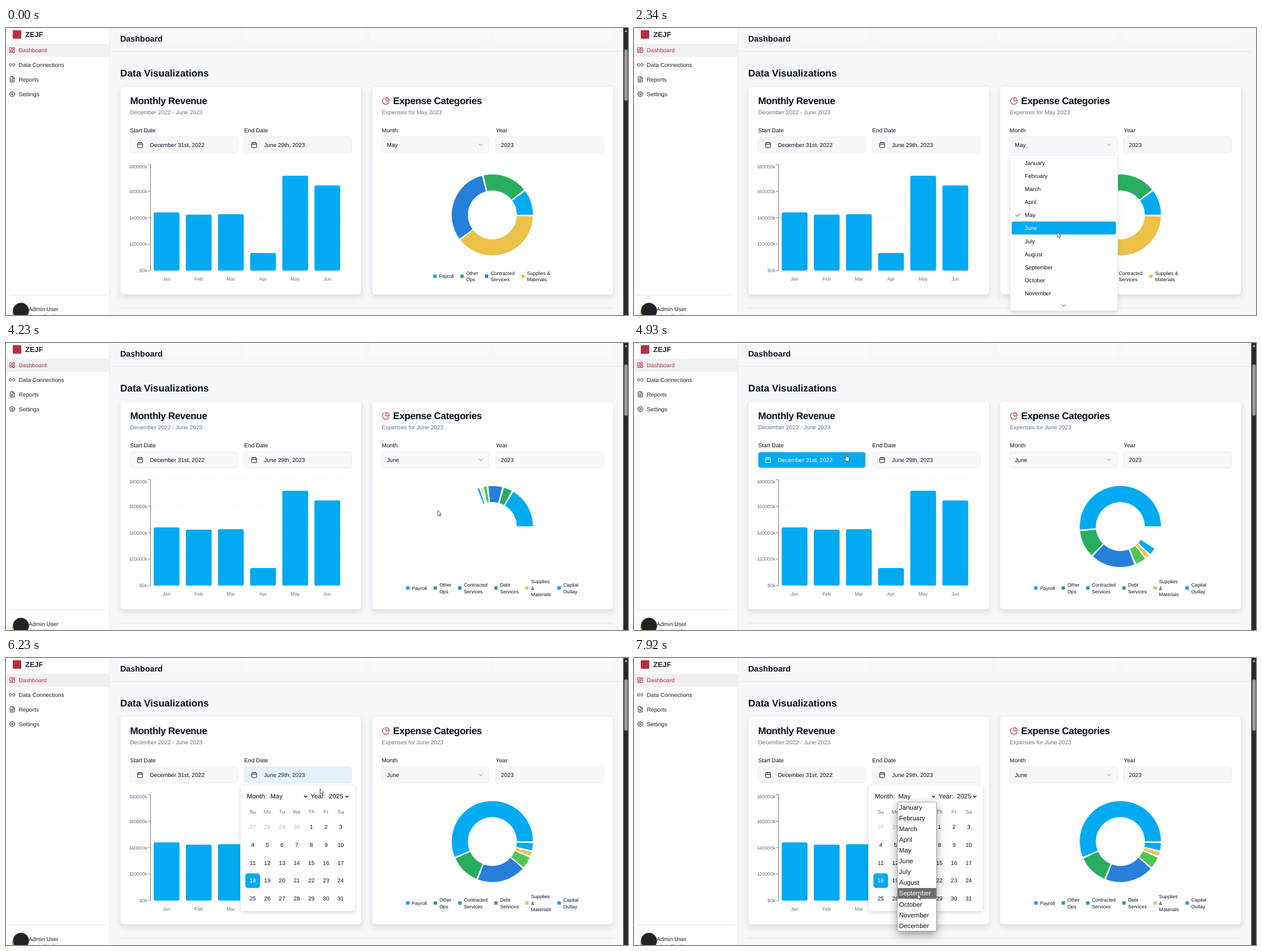
Animation of 1100 by 509 pixels, one loop 7990 ms. Source, as an HTML page:

```html
<!DOCTYPE html>
<html lang="en">
<head>
<meta charset="utf-8">
<title>Dashboard</title>
<style>
html, body { margin: 0; width: 100%; height: 100%; overflow: hidden; background: #f6f8fa; }
svg { display: block; width: 100%; height: 100%; }
text { font-family: "Liberation Sans", Arial, sans-serif; text-rendering: geometricPrecision; white-space: pre; }
.card { filter: drop-shadow(0 5px 5px rgba(15, 23, 42, .11)); }
.pop { filter: drop-shadow(0 2px 3px rgba(15, 23, 42, .15)); }
.menu { filter: drop-shadow(0 6px 8px rgba(0, 0, 0, .38)); }
</style>
</head>
<body>
<svg id="stage" viewBox="0 0 1100 509"></svg>
<script>
const LOOP = 7990;
const INK = '#0b1120', MUTED = '#64748b', RED = '#b5303f', SKY = '#02aaf2', LINE = '#e2e8f0';
const GREEN = '#28ae60', BLUE = '#267fd9', GOLD = '#ecc148', LIME = '#52c655';
const MONTHS = ['January', 'February', 'March', 'April', 'May', 'June', 'July',
  'August', 'September', 'October', 'November', 'December'];
const BODY = 10.1, SMALL = 8.62, LARGE = 11.49;

// --- markup helpers; y is the middle of the capitals ---
const text = (x, y, s, size = BODY, fill = INK, extra = '') =>
  `<text x="${x}" y="${y + size * 0.36}" font-size="${size}" fill="${fill}" ${extra}>${s}</text>`;
const rect = (x, y, w, h, fill, r = 0, extra = '') =>
  `<rect x="${x}" y="${y}" width="${w}" height="${h}" rx="${r}" fill="${fill}" ${extra}/>`;
const line = (x1, y1, x2, y2, stroke = LINE, extra = '') =>
  `<path d="M${x1} ${y1}L${x2} ${y2}" stroke="${stroke}" ${extra}/>`;
const icon = (cx, cy, size, d, stroke = INK, extra = '') =>
  `<path transform="translate(${cx - size / 2} ${cy - size / 2}) scale(${size / 24})" d="${d}"
    fill="none" stroke="${stroke}" stroke-width="2" stroke-linecap="round" stroke-linejoin="round" ${extra}/>`;
const group = (id, body, extra = '') => `<g id="${id}" ${extra}>${body}</g>`;
const MID = 'text-anchor="middle"', BOLD = 'font-weight="700"', EDGE = `stroke="${LINE}" stroke-width=".8"`;

function gear() {
  let d = '';
  for (let i = 0; i < 64; i++) {
    const a = i / 64 * Math.PI * 2;
    const r = 8.7 + 1.5 * Math.max(-1, Math.min(1, 2 * Math.cos(8 * a)));
    d += `${i ? 'L' : 'M'}${(12 + r * Math.cos(a)).toFixed(2)} ${(12 + r * Math.sin(a)).toFixed(2)}`;
  }
  return d + 'ZM15 12a3 3 0 1 1-6 0a3 3 0 1 1 6 0';
}

const ICONS = {
  grid: 'M3 3h7v9H3ZM14 3h7v5h-7ZM14 12h7v9h-7ZM3 16h7v5H3Z',
  link: 'M9 17H7A5 5 0 0 1 7 7h2M15 7h2a5 5 0 1 1 0 10h-2M8 12h8',
  file: 'M15 2H6a2 2 0 0 0-2 2v16a2 2 0 0 0 2 2h12a2 2 0 0 0 2-2V7ZM14 2v6h6M10 9H8M16 13H8M16 17H8',
  gear: gear(),
  cal: 'M8 2v4M16 2v4M3 10h18M5 4h14a2 2 0 0 1 2 2v14a2 2 0 0 1-2 2H5a2 2 0 0 1-2-2V6a2 2 0 0 1 2-2Z',
  pie: 'M21 12c.55 0 1-.45.95-1a10 10 0 0 0-8.95-8.95c-.55-.05-1 .4-1 .95v8a1 1 0 0 0 1 1zM21.2 15.9A10 10 0 1 1 8 2.8',
  down: 'm6 9 6 6 6-6',
  check: 'M20 6 9 17l-5-5'
};

// --- page parts ---
function sidebar() {
  const nav = [['grid', 'Dashboard'], ['link', 'Data Connections'], ['file', 'Reports'], ['gear', 'Settings']];
  return rect(0, 0, 183.5, 509, '#fefefe') + line(183.7, 0, 183.7, 509, '#e8ebef') +
    rect(12, 4, 15, 15, RED, 1) +
    text(34, 11.5, 'ZEJF', 13, '#20242e', BOLD) +
    rect(0, 28, 183.3, 23, '#f1f1f4', 3) +
    nav.map(([k, s], i) => icon(11, 39.2 + 26 * i, 11.5, ICONS[k], i ? '#20242e' : RED) +
      text(22.5, 39.2 + 26 * i, s, BODY, i ? '#20242e' : RED)).join('') +
    line(6, 473.5, 177, 473.5) +
    '<circle cx="25" cy="506" r="14" fill="#e9a24a"/>' +
    text(40, 498, 'Admin User', BODY, '#20242e') +
    text(40, 511, 'admin@zejf', SMALL, MUTED) +
    '<circle cx="26.5" cy="501.5" r="14" fill="#222" stroke="#555" stroke-width=".7"/>';
}

function header() {
  return [203, 422, 644, 862].map(x => rect(x, -8, 210, 32, '#f9fafc', 5)).join('') +
    line(184, 41.7, 1092, 41.7, '#e6eaef') +
    text(202, 18.8, 'Dashboard', 14.36, INK, BOLD) +
    text(202, 79.5, 'Data Visualizations', 17.23, INK, BOLD) +
    line(202, 496.8, 1074, 496.8);
}

const card = x => rect(x, 103.5, 426.5, 369, '#fff', 5.7, `class="card" ${EDGE}`);
const title = (x, s) => text(x, 129, s, 17.23, INK, BOLD + ' letter-spacing="-.43"');
const field = (x, label, body, id = '') => text(x, 181.7, label) +
  group(id || 'field' + x, rect(x, 193.2, 190, 28.2, '#f6f8fa', 4.3, EDGE) + body);
const dateField = (id, x, label, s) => field(x, label,
  icon(x + 17.6, 207.3, 11.5, ICONS.cal) + text(x + 35, 207.3, s), id);

function revenue() {
  const ticks = [242.5, 289.5, 336.4, 383.2, 430.2];
  const tops = [327, 331, 330.3, 399, 262, 279.3];
  let s = card(202) + title(219.5, 'Monthly Revenue') +
    text(219.5, 149.3, 'December 2022 - June 2023', BODY, MUTED) +
    dateField('start', 219.5, 'Start Date', 'December 31st, 2022') +
    dateField('end', 421.3, 'End Date', 'June 29th, 2023');
  ticks.forEach((y, i) => {
    if (i < 4) s += line(256, y, 595, y, '#eef0f3', 'stroke-width=".7" stroke-dasharray="2 1"');
    s += line(250.8, y, 255.5, y, '#666', 'stroke-width=".8"') +
      text(250, i ? y : 245.7, `$${8 - 2 * i || ''}${i < 4 ? '0000' : '0'}k`, SMALL, MUTED,
        'text-anchor="end" clip-path="url(#plot)"');
  });
  s += line(255.5, 242.2, 255.5, 430.5, '#666', 'stroke-width=".9"');
  tops.forEach((y, i) => {
    const x = 261.2 + 56.85 * i;
    s += rect(x, y, 45.6, 430.2 - y, SKY, 2.8) +
      text(x + 22.8, 444.8, MONTHS[i].slice(0, 3), SMALL, MUTED, MID);
  });
  return s;
}

function legend(id, cy, items) {
  return group(id, items.map(([x, color, label]) => {
    const rows = label.split('|');
    return rect(x, cy - 3, 6, 6, color, .8) + rows.map((r, i) =>
      text(x + 10.2, cy + 11.6 * (i - (rows.length - 1) / 2), r, SMALL)).join('');
  }).join(''));
}

function expenses() {
  return card(647.3) + icon(671.8, 129.3, 14.4, ICONS.pie, RED) + title(684.6, 'Expense Categories') +
    text(664.5, 149.3, '', BODY, MUTED, 'id="sub"') +
    field(664.5, 'Month', text(673.5, 207.3, '', BODY, INK, 'id="picked"') +
      icon(839.5, 207.3, 11.5, ICONS.down, INK, 'opacity=".55"')) +
    field(866.2, 'Year', text(875.3, 207.3, '2023')) +
    group('pie', '', 'stroke="#fff" stroke-width=".7"') +
    legend('mayKey', 440.3, [[755.5, SKY, 'Payroll'], [803.5, GREEN, 'Other|Ops'],
      [847, BLUE, 'Contracted|Services'], [911.2, GOLD, 'Supplies &amp;|Materials']]) +
    legend('juneKey', 434.6, [[707.7, '#0ba0ea', 'Payroll'], [756.2, '#3a9f58', 'Other|Ops'],
      [799.6, '#1b92e2', 'Contracted|Services'], [863.5, '#3fa057', 'Debt|Services'],
      [918.4, '#dac078', 'Supplies|&amp;|Materials'], [975.2, '#0ba0ea', 'Capital|Outlay']]);
}

function dropdown() {
  return group('drop', rect(665, 225.2, 190.6, 276, '#fff', 4.3, `class="pop" ${EDGE}`) +
    rect(668, 0, 184.3, 23, SKY, 2.9, 'id="dropMark"') +
    icon(679, 331.7, 11.5, ICONS.check, INK, 'id="tick"') +
    group('dropItems', MONTHS.slice(0, 11).map((m, i) => text(691, 239.6 + 23.05 * i, m)).join('')) +
    icon(760.2, 492, 11.5, ICONS.down));
}

function calendar() {
  const caret = x => `<path d="M${x - 2.6} 244.4l2.6 2.6 2.6-2.6" fill="none" stroke="#111" stroke-width="1.4"/>`;
  const col = i => 436.3 + 25.93 * i;
  let s = rect(414.6, 225.2, 203, 224, '#fff', 4.3, `class="pop" ${EDGE}`) +
    text(426, 245.3, 'Month:', LARGE) + text(467.5, 245.3, 'May', LARGE) + caret(529.8) +
    text(538.6, 245.3, 'Year:', LARGE) + text(571, 245.3, '2025', LARGE) + caret(602.8) +
    rect(423.4, 382, 25.8, 25.8, SKY, 4.3);
  ['Su', 'Mo', 'Tu', 'We', 'Th', 'Fr', 'Sa'].forEach((d, i) => s += text(col(i), 272.6, d, 9.2, MUTED, MID));
  for (let i = 0; i < 35; i++) {
    const day = i - 3, out = day < 1;
    s += text(col(i % 7), 299.5 + 31.7 * Math.floor(i / 7), out ? day + 30 : day, BODY,
      out ? '#b4bbc5' : day === 18 ? '#fff' : INK, MID);
  }
  return group('cal', s);
}

function monthMenu() {
  return group('menu', rect(465.8, 255.4, 69.2, 229, '#fff', 1.5, 'class="menu" stroke="#777" stroke-width=".7"') +
    rect(466.2, 0, 68.4, 19, '#6e6e6e', 0, 'id="menuMark"') +
    group('menuItems', MONTHS.map((m, i) => text(468.8, 265.2 + 19.02 * i, m, LARGE, '#111')).join('')));
}

const scrollbar = group('bar', rect(1091.6, 0, 8.4, 509, '#29292b') +
  rect(1093.4, 38, 6, 91, '#9d9d9d', 3) + '<path d="M1093.8 7h5.4l-2.7-4.4Z" fill="#9d9d9d"/>');

const pointer = group('mouse',
  '<path id="arrow" d="M0 0V9.3L2.1 7.4 3.6 10.8 5 10.2 3.6 6.9H6.5Z"/>' +
  '<path id="hand" d="M-1 1Q0-.6 1 1V4.6L4.6 5.4Q6 5.8 5.8 7.2L5 12.4H-.4L-3.4 8Q-3.6 6.6-2.4 6.8L-1 8Z"/>',
  'fill="#fff" stroke="#222" stroke-width=".75" stroke-linejoin="round"');

const stage = document.getElementById('stage');
stage.innerHTML = '<clipPath id="plot"><path d="M219 230H640V460H219Z"/></clipPath>' +
  rect(0, 0, 1100, 509, '#f6f8fa') + header() + sidebar() + revenue() + expenses() +
  dropdown() + calendar() + monthMenu() + scrollbar + pointer;

// --- motion ---
const $ = id => document.getElementById(id);
const show = (id, on) => $(id).setAttribute('display', on ? 'inline' : 'none');
const clamp = v => Math.max(0, Math.min(1, v));

// CSS "ease" timing
function ease(x) {
  x = clamp(x);
  let lo = 0, hi = 1;
  for (let i = 0; i < 24; i++) {
    const m = (lo + hi) / 2;
    if (.75 * m * (1 - m) + m * m * m < x) lo = m; else hi = m;
  }
  return .3 * (1 - lo) ** 2 * lo + 3 * (1 - lo) * lo * lo + lo ** 3;
}
const ramp = (t, from, span = 150) => ease((t - from) / span);

function mix(a, b, k) {
  return `rgb(${a.map((v, i) => Math.round(v + (b[i] - v) * k))})`;
}

const PATH = [
  [260, 1024, 484], [330, 880, 338], [400, 740, 208], [810, 740, 208], [1400, 736.6, 203],
  [1920, 736.6, 203], [2340, 748.6, 362], [3950, 748.6, 362], [4230, 764.6, 297],
  [4600, 420, 230], [4720, 385, 199], [4930, 375.2, 197.2], [5050, 375.2, 197.2],
  [5500, 548, 206], [6090, 548, 206], [6230, 555.6, 232], [6840, 505, 249],
  [7300, 505, 249], [7920, 501.6, 418]
];
function mouseAt(t) {
  const i = PATH.findIndex(p => p[0] > t);
  if (i < 1) return PATH[i < 0 ? PATH.length - 1 : 0].slice(1);
  const [t0, x0, y0] = PATH[i - 1], [t1, x1, y1] = PATH[i], k = (t - t0) / (t1 - t0);
  return [x0 + (x1 - x0) * k, y0 + (y1 - y0) * k];
}

const MAY = [[36.3, SKY], [64.3, GREEN], [111.7, BLUE], [139.7, GOLD]];
const JUNE = [[202.5, SKY], [42.5, GREEN], [69.3, BLUE], [16.7, LIME], [6, GOLD], [11, SKY]];
function donut(slices, cy, k) {
  const at = (r, deg) => {
    const a = deg * Math.PI / 180;
    return `${(860.1 + r * Math.cos(a)).toFixed(2)} ${(cy - r * Math.sin(a)).toFixed(2)}`;
  };
  const R = 72.2, r = 43;
  let a = 0;
  return slices.map(([span, color]) => {
    const b = a + span * k, big = +(b - a > 180);
    const d = `M${at(R, a)}A${R} ${R} 0 ${big} 0 ${at(R, b)}L${at(r, b)}A${r} ${r} 0 ${big} 1 ${at(r, a)}Z`;
    a = b + 2;
    return `<path d="${d}" fill="${color}"/>`;
  }).join('');
}

function paintDate(id, k) {
  const [box, ico, label] = $(id).children;
  const ink = mix([11, 17, 32], [255, 255, 255], k);
  box.setAttribute('fill', mix([246, 248, 250], [2, 170, 242], k));
  ico.setAttribute('stroke', ink);
  label.setAttribute('fill', ink);
}

function zoomIn(id, k, cx) {
  const s = .95 + .05 * k;
  $(id).setAttribute('opacity', k);
  $(id).setAttribute('transform',
    `translate(${cx * (1 - s)} ${225.2 * (1 - s) - 5.7 * (1 - k)}) scale(${s})`);
}

function mark(listId, markId, row, top, pitch, ink) {
  $(markId).setAttribute('y', top + pitch * row);
  [...$(listId).children].forEach((n, i) => n.setAttribute('fill', i === row ? '#fff' : ink));
}

function draw(t) {
  const [mx, my] = mouseAt(t);

  const open = t >= 1475 && t < 2670;
  show('drop', open);
  show('bar', !open);
  if (open) {
    zoomIn('drop', ramp(t, 1475, 165), 760.3);
    const row = my < 228 ? 4 : Math.floor((my - 228) / 23.05);
    mark('dropItems', 'dropMark', row, 228.1, 23.05, INK);
    $('tick').setAttribute('stroke', row === 4 ? '#fff' : INK);
  }

  const month = t < 2670 ? 'May' : 'June';
  $('sub').textContent = `Expenses for ${month} 2023`;
  $('picked').textContent = month;
  show('mayKey', t < 2670);
  show('juneKey', t >= 3400);
  $('pie').innerHTML = t < 2670 ? donut(MAY, 331.5, 1)
    : t > 3917 ? donut(JUNE, 325.5, ramp(t, 3917, 1580)) : '';

  paintDate('start', ramp(t, 4690) - ramp(t, 5120));
  paintDate('end', ramp(t, 5180) - ramp(t, 6130));

  show('cal', t >= 5650);
  zoomIn('cal', ramp(t, 5650, 170), 516);
  show('menu', t >= 6910);
  mark('menuItems', 'menuMark', my < 256 ? 4 : Math.floor((my - 255.6) / 19.02), 255.8, 19.02, '#111');

  const onDate = my > 193 && my < 221.5 && (mx > 219 && mx < 410 || mx > 421 && mx < 611.5);
  show('mouse', t >= 260);
  show('hand', onDate);
  show('arrow', !onDate);
  $('mouse').setAttribute('transform', `translate(${mx} ${my})`);
}

const begin = performance.now();
function tick() {
  draw((performance.now() - begin) % LOOP);
  requestAnimationFrame(tick);
}
tick();
</script>
</body>
</html>
```
